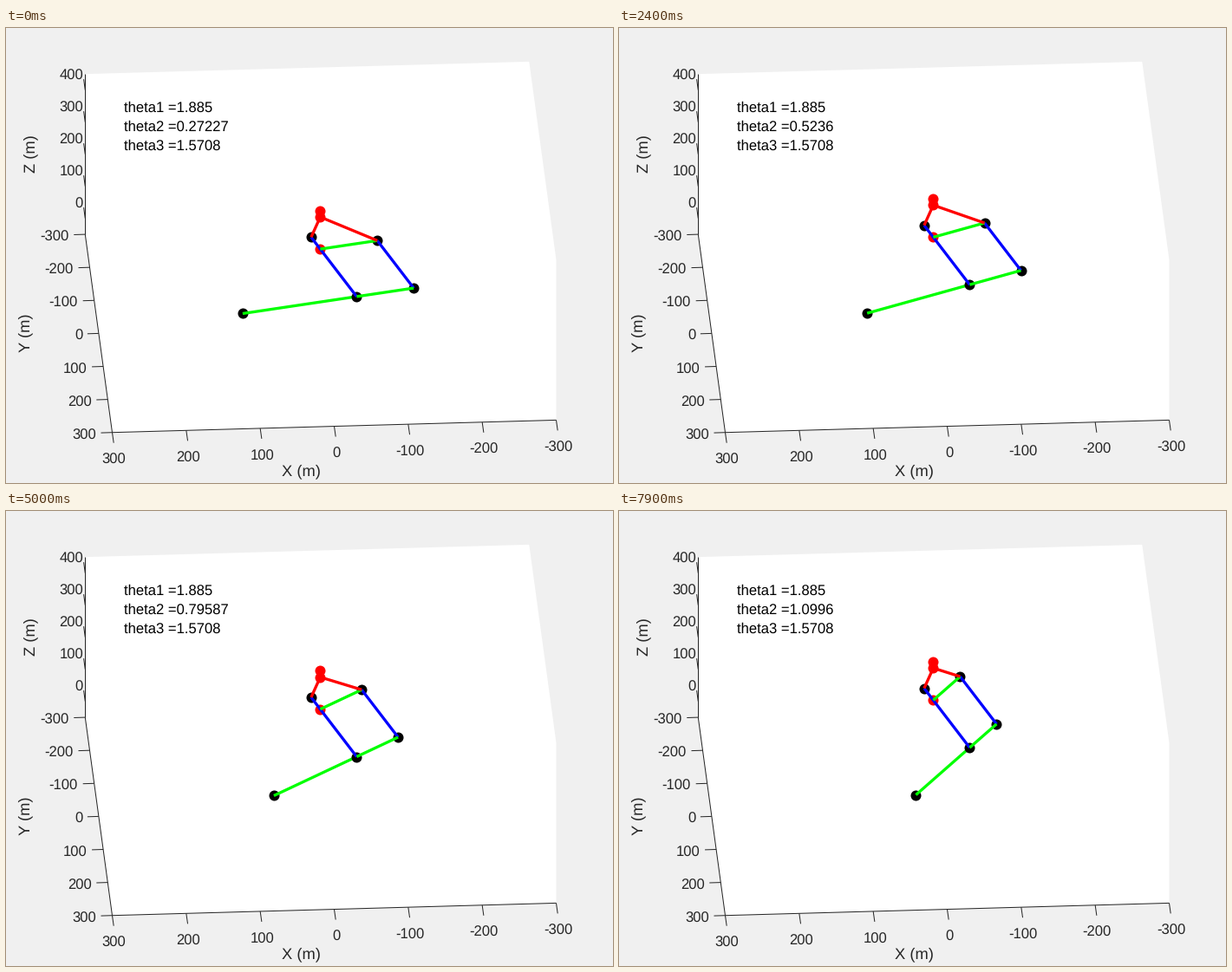
A matplotlib script that plays this animation: 700x525 px, repeating every 8 s.

```python
import numpy as np
import matplotlib as mpl
import matplotlib.pyplot as plt
from matplotlib.animation import FuncAnimation

W, H, DPI = 700, 525, 100
FRAMES, INTERVAL = 80, 100
PX = 72 / DPI
INK = "#262626"
RED, GREEN, BLUE, BLACK = "#ff0000", "#00ff00", "#0000ff", "#000000"

mpl.rcParams["font.family"] = "Liberation Sans"
mpl.rcParams["text.hinting"] = "none"

fig = plt.figure(figsize=(W / DPI, H / DPI), dpi=DPI, facecolor="#f0f0f0")
ax = fig.add_axes([0, 0, 1, 1])
ax.set_xlim(0, W)
ax.set_ylim(H, 0)
ax.axis("off")

# Axonometric projection: screen step for one unit along each axis
CORNER = np.array([122.5, 466.7])  # x = 300, y = 300, z = -50
UX = np.array([-512, 14.3]) / 600
UY = np.array([31.2, 228.6]) / 600
UZ = np.array([0, -0.37])


def project(x, y, z):
    return CORNER + (x - 300) * UX + (y - 300) * UY + (z + 50) * UZ


def segment(p, q, color=INK, width=1.0, z=2):
    return ax.plot([p[0], q[0]], [p[1], q[1]], color=color, lw=width * PX,
                   solid_capstyle="butt", zorder=z)[0]


def label(x, y, text, ha="center", size=16.67, color=INK, **kw):
    # y is the middle of the digits
    return ax.text(x, y + 6, text, ha=ha, va="baseline", fontsize=size * PX,
                   color=color, **kw)


def draw_axes():
    hull = [(300, -300, -50), (300, -300, 450), (-300, -300, 450),
            (-300, 300, 450), (-300, 300, -50), (300, 300, -50)]
    ax.add_patch(plt.Polygon([project(*p) for p in hull], fc="#ffffff",
                             ec="none", zorder=0))
    front, back = project(300, 300, -50), project(300, -300, -50)
    segment(front, project(-300, 300, -50))
    segment(front, back)
    segment(back, project(300, -300, 450))

    for v in range(-300, 301, 100):
        p = project(v, 300, -50)
        segment(p, p + (1.7, 12))
        label(p[0] + 2, p[1] + 30.5, str(v))
        p = project(300, v, -50)
        segment(p, p + (-13, 0.4))
        label(p[0] - 18.8, p[1] + 1.9, str(v), ha="right")
    for v in range(0, 401, 100):
        p = project(300, -300, v)
        segment(p, p + (-1.7, -12.5))
        label(89, p[1] - 17.7, str(v), ha="right")

    label(340, 510, "X (m)", size=18.33)
    for x, y, name in ((28.5, 145.5, "Z (m)"), (22.5, 352, "Y (m)")):
        ax.text(x, y, name, rotation=90, ha="center", va="center",
                fontsize=18.33 * PX, color=INK)


JOINTS = {"A": BLACK, "B": BLACK, "C": BLACK, "D": BLACK,
          "E": RED, "F": BLACK, "G": RED, "H": RED}
LINKS = [("AB", GREEN, 4), ("FB", BLUE, 6), ("CD", BLUE, 6), ("BC", GREEN, 8),
         ("ED", GREEN, 8), ("FG", RED, 9), ("GD", RED, 9), ("GH", RED, 9)]

draw_axes()
dots = {k: ax.plot([], [], "o", ms=12 * PX, mec="none", mfc=c,
                   zorder=3 if k == "A" else 5)[0]
        for k, c in JOINTS.items()}
lines = [(ends, segment((0, 0), (0, 0), c, 3.3, z)) for ends, c, z in LINKS]
label(136, 91, "theta1 =1.885", ha="left", color=BLACK)
theta2 = label(136, 113, "", ha="left", color=BLACK)
label(136, 135, "theta3 =1.5708", ha="left", color=BLACK)

ARM = np.array([42, 54.8])


def pose(theta):
    """Screen positions of all joints for an elbow angle."""
    half = -80 * np.cos(theta) * UX + 80 * np.sin(theta) * UZ
    e = np.array([362.4, 271 - 59.2 * np.sin(theta)])
    b = e + ARM
    return {"A": b - 2 * half, "B": b, "C": b + half, "D": e + half,
            "E": e, "F": e - ARM / 4, "G": e + 100 * UZ, "H": e + 120 * UZ}


def update(i):
    theta = (26 + i) * np.pi / 300
    at = pose(theta)
    for k, dot in dots.items():
        dot.set_data([at[k][0]], [at[k][1]])
    for (p, q), line in lines:
        line.set_data(*zip(at[p], at[q]))
    theta2.set_text(f"theta2 ={theta:.5g}")
    return [*dots.values(), *(line for _, line in lines), theta2]


anim = FuncAnimation(fig, update, frames=FRAMES, interval=INTERVAL,
                     init_func=lambda: update(0), repeat=True, repeat_delay=0)
plt.show()
```
